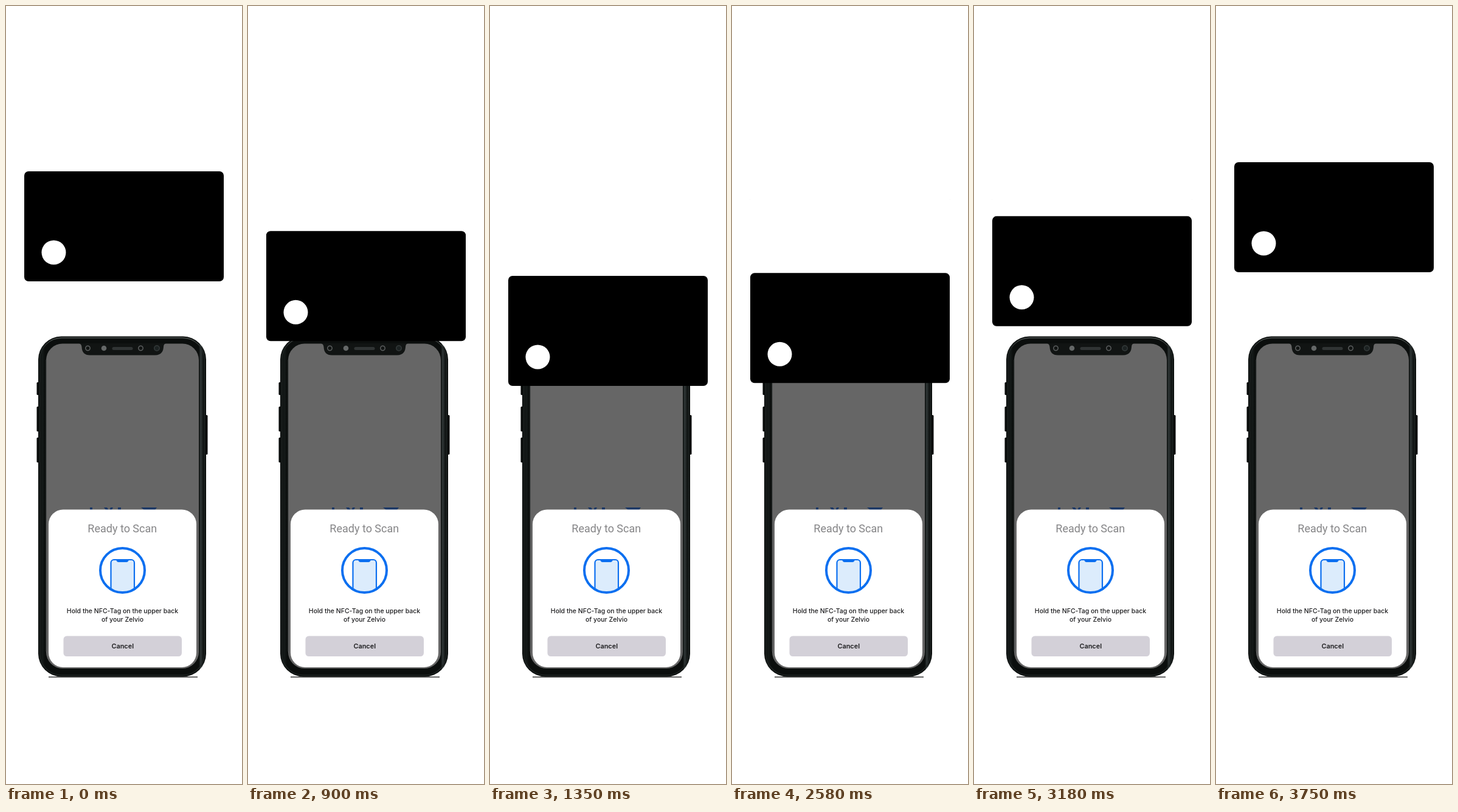
Recreate the animation shown at these times as an HTML page. Size 388x1280 px, loop 4750 ms.

```html
<!DOCTYPE html>
<html lang="en">
<head>
<meta charset="utf-8">
<title>Ready to Scan</title>
<style>
  html, body { margin: 0; width: 100%; height: 100%; overflow: hidden; background: #fff; }
  svg { display: block; width: 100%; height: 100%; }
  text { font-family: Inter, sans-serif; text-anchor: middle; fill: #1c1c1e; }
  .title { font: 18px Roboto, sans-serif; fill: #858587; }
  .hint { font-size: 10.5px; font-weight: 500; }
  .cancel { font-size: 10.9px; font-weight: 600; }
</style>
</head>
<body>
<svg viewBox="0 0 388 1280">
  <defs>
    <linearGradient id="frame">
      <stop offset="0" stop-color="#080b0a"/>
      <stop offset=".025" stop-color="#151a19"/>
      <stop offset=".04" stop-color="#0b0e0d"/>
      <stop offset=".957" stop-color="#0b0e0d"/>
      <stop offset=".968" stop-color="#303737"/>
      <stop offset=".982" stop-color="#121615"/>
      <stop offset="1" stop-color="#080b0a"/>
    </linearGradient>
    <linearGradient id="rim" x2="0" y2="1">
      <stop offset="0" stop-color="#4c5250"/>
      <stop offset=".03" stop-color="#1d2221"/>
      <stop offset="1" stop-color="#1d2221"/>
    </linearGradient>
    <clipPath id="badge"><circle cx="191.5" cy="928.5" r="36"/></clipPath>
  </defs>

  <g id="phone">
    <path d="M70 1104H315" stroke="#333" stroke-width="1.5"/>
    <g fill="#0a0d0c">
      <rect x="50.5" y="619" width="5" height="21" rx="1.5"/>
      <rect x="50.5" y="659" width="5" height="41" rx="1.5"/>
      <rect x="50.5" y="710" width="5" height="41" rx="1.5"/>
      <rect x="326" y="673" width="5.5" height="65" rx="1.5"/>
    </g>
    <rect x="53" y="543.5" width="276" height="560" rx="38" fill="url(#frame)"/>
    <rect x="55.5" y="546" width="271" height="555" rx="36" fill="none" stroke="url(#rim)" stroke-width="1.5"/>
    <rect x="66" y="555.5" width="251" height="534.5" rx="27" fill="#666"/>
    <path d="M66 582V1062" stroke="#3c4040"/>

    <path d="M120 555H263Q259 556 259 561Q258 574.5 245 574.5H138Q125 574.5 124.500 561Q124 556 120 555Z" fill="#111413"/>
    <g fill="none" stroke="#5c5f5f" stroke-width="1.5">
      <circle cx="134.500" cy="563" r="3.7"/>
      <circle cx="221.500" cy="563" r="3.7"/>
      <circle cx="248" cy="563" r="4.2" fill="#1c2222" stroke="#343a3a"/>
    </g>
    <circle cx="161" cy="563" r="4.3" fill="#646767"/>
    <rect x="174.500" y="561" width="34" height="5" rx="2.5" fill="#303434"/>

    <path d="M138 825h4v4h-4zM161 825h5l3 4h-5zM172 825h4l-2 4h-4zM184 825h5v4h-5zM222 825h26l-3 4h-18z" fill="#1b3765"/>
    <rect x="70" y="828.5" width="243" height="259.500" rx="24" fill="#fff"/>
    <text class="title" x="191.300" y="865.5">Ready to Scan</text>

    <g stroke="#0b6ff0" fill="none">
      <g clip-path="url(#badge)">
        <rect x="172.500" y="911" width="38.500" height="62" rx="5" fill="#dcecfc" stroke-width="2.2"/>
        <path d="M181 911H202Q201 915 198 915H185Q182 915 181 911Z" fill="#0b6ff0" stroke="none"/>
      </g>
      <circle cx="191.500" cy="928.500" r="36.500" stroke-width="4"/>
    </g>

    <text class="hint" x="191.500" y="998.500">Hold the NFC-Tag on the upper back</text>
    <text class="hint" x="191.500" y="1013">of your Zelvio</text>
    <rect x="94.500" y="1036.500" width="194.500" height="33.500" rx="5.500" fill="#d3d0d8"/>
    <text class="cancel" x="191.700" y="1057">Cancel</text>
  </g>

  <g id="card">
    <rect x="30" width="328" height="181" rx="7"/>
    <circle cx="78.500" cy="133.500" r="20" fill="#fff"/>
  </g>
</svg>
<script>
  const LOOP = 4750, TICK = 30;
  const START = 272, LOW = 444, END = 257;
  const card = document.getElementById('card');

  // Fraction of a linear move that advances once per tick, beginning at `from`.
  function progress(time, from, steps) {
    const done = Math.floor((time - from) / TICK) + 1;
    return Math.min(Math.max(done, 0), steps) / steps;
  }

  function draw() {
    const time = performance.now() % LOOP;
    const down = (LOW - START) * progress(time, 330, 35);
    const up = (END - LOW) * progress(time, 2580, 40);
    card.setAttribute('transform', `translate(0 ${START + down + up})`);
    requestAnimationFrame(draw);
  }
  draw();
</script>
</body>
</html>
```
